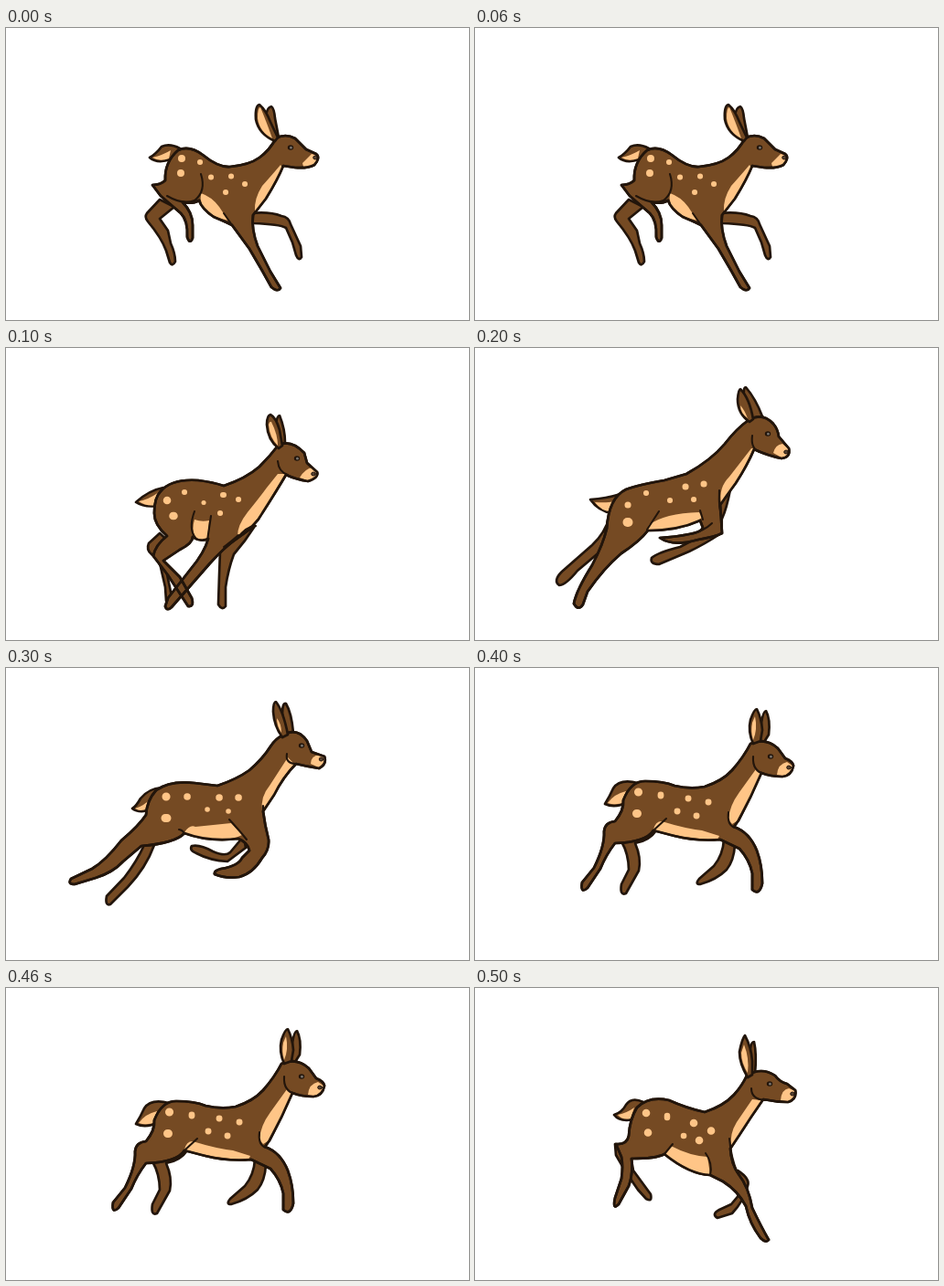
These frames come from a looping animation (506 px wide and 320 px high, 0.6 s). An HTML page without scripts:

```html
<!DOCTYPE html>
<html lang="en">
<head>
<meta charset="utf-8">
<title>Running fawn</title>
<style>
html, body { margin: 0; width: 100%; height: 100%; overflow: hidden; background: #fff; }
svg { display: block; width: 100%; height: 100%; fill: #754a23; stroke: #22150b; stroke-width: 2.7; stroke-linejoin: round; stroke-linecap: round; }
.pose { visibility: hidden; animation: show .6s step-end infinite; animation-delay: calc(var(--i) * .1s - .6s); }
.peach { fill: #ffc587; stroke: none; }
.line { fill: none; stroke-width: 2.1; }
.spots { fill: none; stroke: #ffc587; stroke-width: 6; }
.big { stroke-width: 9; }
@keyframes show { 0% { visibility: visible; } 16.6667%, 100% { visibility: hidden; } }
</style>
</head>
<body>
<svg viewBox="0 0 506 320">
<defs>
  <g id="eye" stroke="none"><ellipse rx="3.2" ry="2.7" fill="#22150b"/><circle cx=".4" cy=".2" r="1.4" fill="#77736d"/></g>
  <ellipse id="nose" rx="2.3" ry="2" fill="#574334" stroke="#22150b" stroke-width="1"/>
</defs>

<g class="pose" style="--i:0">
  <path d="M168 188L154 203Q151 207 155 212Q170 230 175 244L179 257Q182 262 185 256Q185 247 180 236L177 222 168 209 184 196Z"/>
  <path d="M268 203Q288 201 301 206Q309 207 311 215L322 239 323 251Q320 256 317 249L313 235 306 219Q299 215 270 214Z"/>
  <path d="M190 132Q179 126 170 130Q164 138 157 142Q165 149 180 144Z"/>
  <path class="peach" d="M160 142Q172 139 180 134L178 143Q168 147 160 142Z"/>
  <path d="M284 97Q285 87 290 86Q293 88 294 99L298 120 291 117Z"/>
  <path id="b0" d="M295 121Q305 115 316 121Q322 127 328 133L339 138Q344 142 337 150Q330 154 316 153L303 151Q297 166 284 187L270 205Q268 220 275 239L289 267 300 285Q297 290 290 284L280 266 266 242 247 216Q239 212 227 207Q214 198 211 189Q204 193 193 191Q204 202 204 216V230Q201 238 198 229Q199 211 191 203L169 184 160 172Q169 172 174 167Q173 147 188 134Q200 128 215 139Q232 153 245 152Q266 150 277 142Q288 134 295 121Z"/>
  <path class="peach" d="M213 181Q225 185 233 196L243 211Q229 208 220 201Q211 194 213 181ZM300 150L302 153 284 186 272 201Q271 187 280 173Q289 163 300 150ZM324 148L334 138Q343 140 339 146Q336 153 325 152Z"/>
  <use href="#b0" fill="none"/>
  <path class="line" d="M213 160Q219 179 206 189Q193 194 176 184M238 203L247 216"/>
  <path d="M294 124Q276 116 273 100Q272 85 277 84Q284 90 289 103L297 120Z"/>
  <path class="peach" d="M291 121Q277 114 275 99Q275 87 278 87Q284 101 291 121Z"/>
  <path class="spots" d="M212 147h.1M224 163.500h.1M246 162.500h.1M240 180h.1M261 171h.1"/>
  <path class="spots big" d="M192 143v.1M191 159v.1" style="stroke-width:8"/>
  <use href="#nose" x="338" y="142"/><use href="#eye" x="311" y="131"/>
</g>

<g class="pose" style="--i:1">
  <path d="M272 195Q262 211 249 226Q243 242 240 262V283Q236 288 232 281L233 250 234 222Z"/>
  <path d="M168 203L156 214Q153 221 159 226Q167 231 169 240L174 262 175 277 181 272 176 248 170 232 180 214Z"/>
  <path d="M172 153Q156 156 142 169Q151 175 166 173Z"/>
  <path class="peach" d="M145 168Q156 166 167 158L164 172Q154 174 145 168Z"/>
  <path d="M295 85Q296 74 299 74Q305 89 305 104L299 105Z"/>
  <path id="b1" d="M298 106Q312 100 326 115L329 126 340 136Q342 142 330 146Q317 144 306 139Q296 156 280 181Q273 195 252 209Q238 219 222 237L181 284Q176 289 174 283L177 274 202 242Q217 224 221 209Q213 213 204 207Q204 214 190 221L172 233 190 251 203 274Q206 284 199 283L177 249 161 228Q163 216 176 206Q162 194 162 181Q162 164 169 157Q181 143 210 145Q226 147 238 151Q262 143 277 130Q289 118 298 106Z"/>
  <path class="peach" d="M206 188Q214 191 222 189L220 210Q211 213 206 206Q203 198 206 188ZM297 138H305L280 180Q270 195 253 206Q253 194 264 180Q277 164 285 153ZM321 142Q327 132 335 131L340 137Q340 144 329 145Z"/>
  <use href="#b1" fill="none"/>
  <path class="line" d="M206 179Q199 198 207 208M224 184L220 211M252 209Q264 194 273 195M238 218Q245 213 254 205M297 124Q298 136 308 139"/>
  <path d="M298 110Q286 101 285 84Q285 74 289 73Q295 76 299 90L302 107Z"/>
  <path class="peach" d="M297 107Q288 98 287 84Q288 80 290 81Q297 95 297 107Z"/>
  <path class="spots" d="M195 158h.1M237 161h1M254 166h.1M234 181h.1"/>
  <path class="spots" style="stroke-width:5" d="M216 169.500h.1"/>
  <path class="spots big" d="M176 167h.1M182.500 184h1" style="stroke-width:8.500"/>
  <use href="#nose" x="336" y="138"/><use href="#eye" x="318" y="121"/>
</g>

<g class="pose" style="--i:2">
  <path d="M147 185Q142 203 128 216L95 245Q85 255 92 260Q99 260 112 244L138 222Z"/>
  <path d="M279 155Q275 176 270 187L262 170Z"/>
  <path d="M269 203Q251 215 234 223L201 237Q191 237 193 230Q200 224 224 218L247 206Z"/>
  <path d="M159 160Q143 165 126 166Q135 179 150 181Z"/>
  <path class="peach" d="M131 169Q145 170 152 168L149 179Q138 179 131 169Z"/>
  <path d="M294 53Q293 43 296 43Q307 56 314 75L304 79Z"/>
  <path id="b2" d="M299 79Q314 70 326 83Q331 89 332 97L343 110Q345 120 335 121Q320 118 305 111Q298 128 285 148Q274 163 268 172L270 203Q262 207 244 210Q216 218 202 208Q220 207 234 204Q247 202 249 197L246 189Q222 200 189 200Q180 212 160 225Q141 241 123 267L118 281Q113 289 108 280Q111 265 128 238Q140 215 144 198Q146 164 165 155Q178 150 207 145L231 138Q258 123 273 105Q286 88 299 79Z"/>
  <path class="peach" d="M190 194Q207 181 245 180L248 186Q232 198 189 200ZM302 110H304Q295 132 276 160L269 170Q266 153 278 141ZM326 115Q328 106 336 105L343 111Q343 119 335 120Z"/>
  <use href="#b2" fill="none"/>
  <path class="line" d="M267 156Q266 177 270 187V203M246 178L249 188M188 199L201 179M303 96Q301 110 311 114M236 204Q251 200 259 192"/>
  <path d="M300 81Q287 72 287 56Q288 45 290 45Q300 55 304 78Z"/>
  <path class="peach" d="M298 77Q290 71 290 63Q294 67 298 77Z"/>
  <path class="spots" d="M187 159h.1M213 167h.1M239 166h.1"/>
  <path class="spots" style="stroke-width:7" d="M167 172h.1M230 152h.1M250 149h.1"/>
  <path class="spots" style="stroke-width:10" d="M166.500 191h1"/>
  <use href="#nose" x="340" y="114"/><use href="#eye" x="320" y="94"/>
</g>

<g class="pose" style="--i:3">
  <path d="M151 194Q143 212 129 230L110 250Q108 261 114 259L133 240Q153 219 162 194Z"/>
  <path d="M260 184L245 202Q240 207 226 201Q212 193 203 195Q200 200 208 203Q223 211 242 212L262 197Z"/>
  <path d="M170 131Q156 132 147 143Q142 152 138 154Q144 159 157 156Z"/>
  <path class="peach" d="M141 154Q151 151 157 144L154 154Q147 158 141 154Z"/>
  <path d="M302 50Q302 38 306 39Q312 49 314 71L306 73Z"/>
  <path id="b3" d="M302 74Q318 64 329 80L334 92 348 97Q351 105 342 110Q329 108 317 105Q303 119 293 139L281 157Q283 173 287 188Q288 199 280 208Q270 225 255 229Q239 231 228 226Q227 222 235 220Q254 217 258 208L266 200Q264 191 254 187Q222 191 195 181Q185 192 148 195L128 212Q117 224 98 230L75 237Q67 237 71 231L94 220Q109 211 126 189Q145 173 153 161Q154 145 164 134Q179 123 206 126L231 129Q252 122 266 112Q281 99 289 86Q295 77 302 74Z"/>
  <path class="peach" d="M195 180Q201 171 207 174L246 170 258 183Q247 189 226 188 206 186 195 180ZM308 98L315 105Q300 121 292 140L280 156Q278 141 288 129ZM333 105Q333 96 343 95L348 99Q350 104 342 109Z"/>
  <use href="#b3" fill="none"/>
  <path class="line" d="M244 166Q256 179 263 188M281 151V160M195 181Q192 177 189 177M307 94Q305 104 316 105"/>
  <path d="M302 76Q293 64 292 48Q292 37 295 37Q303 47 308 73Z"/>
  <path class="peach" d="M301 71Q296 64 296 55Q301 61 301 71Z"/>
  <path class="spots" d="M220 155h.1M243 157h.1" style="stroke-width:5.500"/>
  <path class="spots" d="M198 141h.1M233 142h.1M254 142h.1" style="stroke-width:7.500"/>
  <path class="spots big" d="M175 141h.1M174 164.500h2"/>
  <use href="#nose" x="344.500" y="100"/><use href="#eye" x="323" y="85"/>
</g>

<g class="pose" style="--i:4">
  <path d="M160 190Q168 204 168 221L160 237Q158 250 165 247L179 222Q182 208 175 192Q191 189 198 178Z"/>
  <path d="M272 188Q271 205 261 217L245 231Q240 237 246 237Q264 232 275 221Q283 211 284 194Z"/>
  <path d="M178 126Q158 121 151 132Q147 141 142 149Q153 154 167 147Z"/>
  <path class="peach" d="M145 148Q152 138 165 135L163 147Q154 151 145 148Z"/>
  <path d="M313 60Q315 47 318 47Q323 56 321 73L316 81 311 79Z"/>
  <path id="b4" d="M301 83Q318 76 331 88L339 99Q347 102 348 107Q346 118 336 119Q323 119 313 115Q302 141 288 167L283 174Q300 180 308 200Q314 216 314 236Q311 250 303 243L303 225Q300 210 289 198L268 188Q241 190 218 184L195 178Q187 191 153 192Q143 205 137 220L123 241Q115 248 117 235L130 219Q142 195 141 179Q142 169 153 168Q163 156 162 145Q170 124 186 124Q206 124 218 129Q235 133 251 130Q270 124 281 112Q294 97 301 83Z"/>
  <path class="peach" d="M195 177Q197 168 204 168Q230 176 248 178L267 184 265 188Q232 188 195 177ZM307 111L313 116Q303 139 286 168L281 171 277 166Q278 151 289 136ZM330 117Q331 105 341 103L348 108Q345 117 336 118Z"/>
  <use href="#b4" fill="none"/>
  <path class="line" d="M277 158Q275 172 284 175M195 178L209 165M304 97Q303 113 316 116"/>
  <path d="M304 83Q298 69 301 57Q305 45 308 45Q313 55 314 68L312 80Z"/>
  <path class="peach" d="M304 79Q301 70 303 60L306 53Q309 67 304 79Z"/>
  <path class="spots" d="M221 157h.1M242 162h.1M203 139v1M233 143h.1M255 147h.1" style="stroke-width:6.800"/>
  <path class="spots big" d="M178.500 136h.1M176.500 159.500h1"/>
  <use href="#nose" x="343" y="109"/><use href="#eye" x="323" y="97"/>
</g>

<g class="pose" style="--i:5">
  <path d="M153 171L154 183 165 202 178 221 187 231Q194 235 192 226L173 200 168 172Z"/>
  <path d="M287 200Q301 209 298 217Q294 233 281 247L265 252Q258 248 267 243L280 237 290 225Z"/>
  <path d="M184 125Q171 119 165 128Q161 136 152 139Q158 147 173 144Z"/>
  <path class="peach" d="M156 139Q166 137 174 131L170 143Q161 145 156 139Z"/>
  <path d="M301 66Q302 59 305 59Q308 72 306 94L299 96Z"/>
  <path id="b5" d="M297 96Q313 86 328 96Q333 103 341 105L350 112Q352 122 342 125Q329 125 315 122Q301 142 289 161L279 176Q280 193 288 204Q299 218 303 241Q313 262 321 276Q318 280 312 274Q300 258 296 239Q287 222 271 212L257 205Q234 204 207 182Q198 187 171 187Q173 203 168 217L157 237Q150 244 153 230L160 209Q162 195 160 185L154 171Q166 172 168 162Q169 144 177 131Q190 118 212 123Q232 132 251 136Q272 129 283 117Q292 107 297 96Z"/>
  <path class="peach" d="M208 182L214 173Q235 184 254 185L257 204Q237 204 208 182ZM303 122L313 123 288 162 280 174Q278 160 286 147ZM334 123Q335 111 343 110L350 113Q350 122 342 124Z"/>
  <use href="#b5" fill="none"/>
  <path class="line" d="M252 181Q260 192 257 205M278 165Q280 187 287 203M207 182L216 171M302 110Q302 122 317 123"/>
  <path d="M298 98Q289 83 289 70Q292 55 295 52Q302 65 303 80L303 95Z"/>
  <path class="peach" d="M298 93Q291 82 291 71L294 62Q300 77 298 93Z"/>
  <path class="spots" d="M228 162h.1M210 140v2" style="stroke-width:6.500"/>
  <path class="spots big" d="M187 137h.1M189 158.500h.1M239 148h.1M258 156.500h.1M245 167h.1" style="stroke-width:8.500"/>
  <use href="#nose" x="347" y="116"/><use href="#eye" x="322" y="105"/>
</g>
</svg>
</body>
</html>
```
